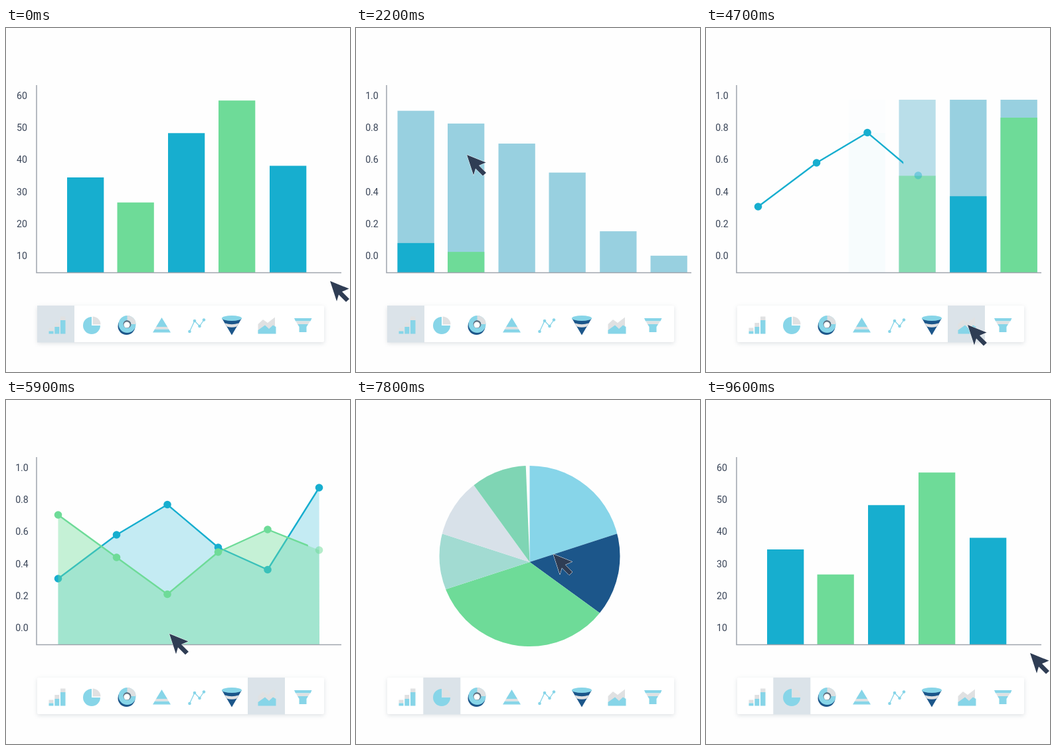
These frames come from a looping animation (518 px wide and 518 px high, 9.7 s). An HTML page:

```html
<!DOCTYPE html>
<html lang="en">
<head>
<meta charset="utf-8">
<title>Chart types</title>
<style>
  html, body { margin: 0; width: 100%; height: 100%; overflow: hidden; background: #fefefe; }
  svg { display: block; width: 100vw; height: 100vh; }
  .labels { font: 14.2px Roboto, Arial, sans-serif; fill: #3a4558; text-anchor: middle; }
  .tag { font: 700 20.5px "Open Sans", "Noto Sans", sans-serif; fill: #fff; text-anchor: middle; }
  .panel { filter: drop-shadow(0 2px 3px rgba(60, 80, 100, .16)); }
  .sheet { filter: drop-shadow(0 1px 2px rgba(40, 60, 80, .22)); }
  .blue { fill: #17aecf; }
  .green { fill: #6edb98; }
  .pale { fill: #98d0e0; }
  .sky { fill: #87d5e8; }
  .grey { fill: #e0e1e2; }
  .navy { fill: #1c568a; }
  .line { fill: none; stroke-width: 2.4; stroke-linejoin: round; }
</style>
</head>
<body>
<svg viewBox="0 0 518 518">
  <defs>
    <clipPath id="disc"><circle cx="261.5" cy="235" r="136"/></clipPath>
    <clipPath id="wipe0"><rect x="60" y="80" width="0" height="300"/></clipPath>
    <clipPath id="wipe1"><rect x="60" y="80" width="0" height="300"/></clipPath>
  </defs>

  <g id="chart">
    <g id="tens" class="labels"></g>
    <g id="units" class="labels"></g>
    <g id="bars"></g>
    <g id="stacks"></g>
    <g id="series"></g>
    <path d="M46 86V368.4H505" fill="none" stroke="#9fa4ad" stroke-width="1.5"/>
  </g>
  <g id="pie" clip-path="url(#disc)"></g>

  <rect class="panel" x="47" y="418" width="432" height="55" rx="2" fill="#fff"/>
  <rect id="pick" y="418" width="56" height="55.5" fill="#dbe3e9"/>
  <g id="icons">
    <path class="grey" d="M64.5 451.5h7v5h-7zM73.3 444h7v6h-7zM82 434.500h7.500v6h-7.500z"/>
    <path class="sky" d="M64.500 456.500h7v4h-7zM73.300 450h7v10.500h-7zM82 440h7.500v20.500h-7.500z"/>

    <path class="sky" d="M129 448V435A13 13 0 1 0 142 448Z"/>
    <path class="grey" d="M130.500 446.500V434.500A12 12 0 0 1 142.500 446.500Z"/>

    <circle class="navy" cx="181.500" cy="449" r="13"/>
    <circle cx="182.500" cy="446.500" r="9.500" fill="#5f6f80"/>
    <g fill="none" stroke-width="7">
      <circle cx="182.500" cy="446" r="9.500" stroke="#87d5e8"/>
      <path d="M182.500 436.500A9.500 9.500 0 0 1 192 446" stroke="#dddfe1"/>
    </g>
    <circle cx="182" cy="447" r="4.600" fill="#fff"/>

    <path class="sky" d="M234.500 436L243 450H226ZM224 453.500H245L248 458.500H221Z"/>
    <path class="grey" d="M226 450H243L245 453.500H224Z"/>

    <path d="M276.500 457L284 441L291.500 449L298 439.500" fill="none" stroke="#87d5e8" stroke-width="1.300"/>
    <g class="sky">
      <circle cx="276.500" cy="457" r="2.300"/><circle cx="284" cy="441" r="2.300"/>
      <circle cx="291.500" cy="449" r="2.300"/><circle cx="298" cy="439.500" r="2.300"/>
    </g>

    <path class="navy" d="M325 437H355L340 462.500Z"/>
    <path class="grey" d="M329.500 444.500Q340 448 350.500 444.500L347.500 449.500Q340 452 332.500 449.500Z"/>
    <ellipse class="sky" cx="340" cy="437" rx="15" ry="4"/>

    <path class="grey" d="M379.500 446L387 439L394 444L405 435.500V460H379.500Z"/>
    <path class="sky" d="M379.500 455L390 447.500L396 453L402 447.500L406.500 450V460.500H379.500Z"/>

    <path class="sky" d="M434 437H460.500L458.500 441.500H436ZM439 446H455L452.500 450V458H441.500V450Z"/>
    <path class="grey" d="M436.500 441.500H458L455 446H439Z"/>
  </g>

  <g id="doc">
    <path class="sheet" d="M-39 -58H13L33 -38V37Q33 40 30 40H-40Q-43 40 -43 37V-54Q-43 -58 -39 -58Z" fill="#f1f2f2"/>
    <path d="M13 -58L33 -38H16Q13 -38 13 -41Z" fill="#dcdede"/>
    <path d="M-28 -7H16M-28 1.500H16M-28 10H16M-28 19H16" stroke="#c7c9ca" stroke-width="3.500"/>
    <path d="M-50 -17H-43V-12Z" fill="#49a86e"/>
    <rect x="-50" y="-44" width="57" height="27" rx="1.500" fill="#66d68f"/>
    <text class="tag" x="-21.500" y="-23">XLS</text>
  </g>
  <path id="cursor" d="M0 0L28.500 11.500L18 16L29 27L24 31.500L13 20.500L10 30.500Z"
        fill="#2f3d54" stroke="#fff" stroke-width="1" paint-order="stroke"/>
</svg>

<script>
const LOOP = 9700, STEP = 100, BASE = 368;
const $ = id => document.getElementById(id);
const clamp = v => Math.min(1, Math.max(0, v));
const ramp = (t, from, to) => clamp((t - from) / (to - from));
const easeOut = p => 1 - (1 - p) ** 3;
const easeInOut = p => p < .5 ? 2 * p * p : 1 - 2 * (1 - p) ** 2;
const fade = (el, a) => el.setAttribute("opacity", a);
const tint = i => i % 2 ? "green" : "blue";

const barX = [92, 167.5, 244, 320, 397];
const barTop = [225, 262.7, 158.3, 109.2, 207.5];
const stackX = [62.5, 138, 214.5, 290.5, 367.2, 443.5];
const stackTop = [271, 203, 158, 222.5, 253.3, 135];
const stackStart = [2090, 2160, 2230, 2300, 2398, 2430];
const pointX = [78.5, 166.5, 243, 319.5, 394, 471.5];
const series = [
  { color: "#17aecf", y: [269, 203, 157.5, 222, 255.5, 132], start: 4145, area: .25, fill: [5150, 5450] },
  { color: "#6edb98", y: [173, 237, 292.5, 229, 195, 226], start: 4945, area: .4, fill: [5500, 5850] }
];
const arrival = (start, i) => start + (pointX[i] - pointX[0]) / .394;

const slices = [
  [0, 72, "#87d5e9"], [72, 126, "#1c568a"], [126, 252, "#6edb98"],
  [252, 288, "#a2dbd2"], [288, 324, "#d8e1e9"], [324, 360, "#7fd5b4"]
];

// time, x, y of the pointer tip
const track = [
  [0, 488, 381], [100, 488, 381], [700, 494, -70], [800, 470, -105],
  [1400, 316, 225], [1750, 316, 225], [2650, 18, 157], [2800, 22, 160],
  [3850, 394, 447], [5200, 394, 447], [5900, 246, 352], [6700, 133, 462],
  [7050, 133, 462], [7800, 297, 232], [8750, 488, 381], [LOOP, 488, 381]
];

function slope(i, axis) {
  const a = track[i - 1], b = track[i], c = track[i + 1];
  if (!a || !c) return 0;
  const before = b[axis] - a[axis], after = c[axis] - b[axis];
  return before * after <= 0 ? 0 : (before + after) / (c[0] - a[0]);
}

function pointer(t) {
  let i = 0;
  while (i < track.length - 2 && t >= track[i + 1][0]) i++;
  const a = track[i], b = track[i + 1], span = b[0] - a[0], p = (t - a[0]) / span;
  return [1, 2].map(k => {
    const m = slope(i, k) * span, n = slope(i + 1, k) * span;
    return a[k] + m * p + (3 * (b[k] - a[k]) - 2 * m - n) * p * p
      + (m + n - 2 * (b[k] - a[k])) * p ** 3;
  });
}

function build() {
  const column = texts => texts.map((s, i) => `<text x="24" y="${107 + i * 48.2}">${s}</text>`).join("");
  const rect = (x, cls) => `<rect class="${cls}" x="${x}" width="55.3" y="${BASE}" height="0"/>`;
  $("tens").innerHTML = column([60, 50, 40, 30, 20, 10]);
  $("units").innerHTML = column(["1.0", "0.8", "0.6", "0.4", "0.2", "0.0"]);
  $("bars").innerHTML = barX.map((x, i) => rect(x, tint(i))).join("");
  $("stacks").innerHTML = stackX.map((x, i) => `${rect(x, "pale")}${rect(x, tint(i))}`).join("");
  $("series").innerHTML = series.map((s, k) => {
    const pts = pointX.map((x, i) => `${x},${s.y[i]}`).join(" ");
    const dots = pointX.map((x, i) => `<circle cx="${x}" cy="${s.y[i]}" r="5.8"/>`).join("");
    return `<polygon points="${pts} 472,${BASE} 78.5,${BASE}" fill="${s.color}"/>
      <polyline class="line" points="${pts}" stroke="${s.color}" clip-path="url(#wipe${k})"/>
      <g fill="${s.color}">${dots}</g>`;
  }).join("");
  $("pie").innerHTML = slices.map(s => `<path fill="${s[2]}"/>`).join("");
}

function setHeight(el, h) {
  el.setAttribute("y", BASE - h);
  el.setAttribute("height", Math.max(0, h));
}

function drawBars(t) {
  [...$("bars").children].forEach((el, i) => {
    const grow = t < 5000
      ? 1 - easeInOut(ramp(t, 1650 + 20 * i, 1900 + 20 * i))
      : easeOut(ramp(t, 8950 + 60 * i, 9350 + 60 * i));
    setHeight(el, (BASE - barTop[i]) * grow);
  });
}

function drawStacks(t) {
  const rects = $("stacks").children;
  stackX.forEach((x, i) => {
    const start = stackStart[i], out = arrival(series[0].start, i) - 157;
    const pale = rects[2 * i], solid = rects[2 * i + 1];
    setHeight(pale, 260 * easeOut(ramp(t, start - 250, start + 350)));
    setHeight(solid, (BASE - stackTop[i]) * easeOut(ramp(t, start, start + 600)));
    const alpha = 1 - ramp(t, out, out + 300);
    fade(pale, alpha);
    fade(solid, alpha);
  });
}

function drawSeries(t) {
  const parts = $("series").children;
  series.forEach((s, k) => {
    const [area, , dots] = [...parts].slice(3 * k, 3 * k + 3);
    fade(area, s.area * ramp(t, ...s.fill));
    const reach = ramp(t, s.start, s.start + 1000);
    const width = reach ? 18.5 + 394 * reach : 0;
    $("wipe" + k).firstElementChild.setAttribute("width", width);
    [...dots.children].forEach((dot, i) => {
      const at = arrival(s.start, i);
      fade(dot, ramp(t, at - 110, at + 20));
    });
  });
}

function drawPie(t) {
  const sweep = 360 * easeInOut(ramp(t, 6880, 7855));
  const spot = deg => {
    const a = deg * Math.PI / 180;
    return `${261.5 + 300 * Math.sin(a)} ${244 - 300 * Math.cos(a)}`;
  };
  [...$("pie").children].forEach((el, i) => {
    const [from, to] = slices[i], end = Math.min(to, sweep);
    el.setAttribute("d", end > from
      ? `M261.5 244L${spot(from)}A300 300 0 0 1 ${spot(end)}Z` : "");
  });
  fade($("pie"), 1 - ramp(t, 8450, 8800));
}

function draw(t) {
  drawBars(t);
  drawStacks(t);
  drawSeries(t);
  drawPie(t);

  const late = t > 8000;
  fade($("chart"), late ? ramp(t, 8850, 9100) : 1 - ramp(t, 6500, 6850));
  fade($("series"), late ? 0 : 1);
  const swap = late ? 0 : ramp(t, 1200, 1450);
  fade($("tens"), 1 - swap);
  fade($("units"), swap);

  $("pick").setAttribute("x", t < 3900 ? 47 : t < 6800 ? 364 : 101.3);

  const [x, y] = pointer(t), place = `translate(${x} ${y})`;
  $("cursor").setAttribute("transform", place);
  $("doc").setAttribute("transform", t < 1750 ? place : "translate(316 225)");
  fade($("doc"), t < 800 ? 0 : 1 - ramp(t, 1650, 1900));
}

build();
const began = performance.now();
function tick() {
  const t = (performance.now() - began) % LOOP;
  draw(Math.floor(t / STEP) * STEP);
  requestAnimationFrame(tick);
}
tick();
</script>
</body>
</html>
```
